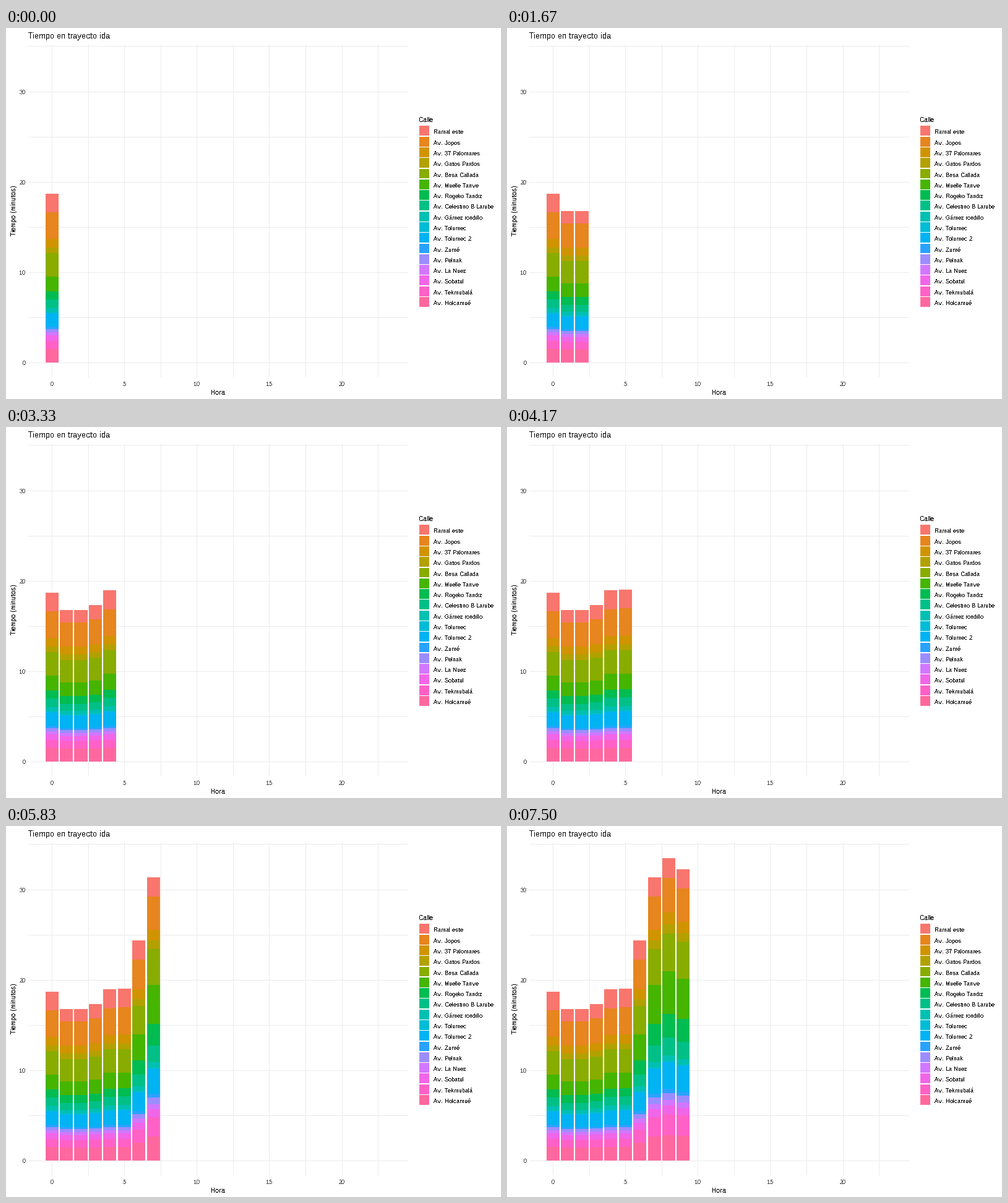
Write a matplotlib script that moves like this. It is 800 by 600 pixels and loops after 8000 ms.

```python
import math

import matplotlib.pyplot as plt
import numpy as np
from matplotlib.animation import FuncAnimation
from matplotlib.patches import Rectangle

W, H, DPI = 800, 600, 100
LOOP, INTERVAL = 8000, 40
STEP = 5000 / 6  # one more hour appears each step, in ms

plt.rcParams.update({
    "font.family": "Liberation Sans",
    "text.hinting": "native",
    "text.hinting_factor": 1,
    "text.antialiased": False,
})

# Minutes for the whole trip, by hour
TOTALS = [18.7, 16.78, 16.78, 17.33, 18.98, 19.05, 24.38, 31.36, 33.48, 32.25]

# Each street's weight in a light, a normal and a heavy hour
KEY_TOTALS = (16.8, 18.9, 32.4)
STREETS = [
    ("Ramal este", (20, 31, 31)),
    ("Av. Jopos", (39, 44, 55)),
    ("Av. 37 Palomares", (13, 14, 18)),
    ("Av. Gatos Pardos", (9, 9, 14)),
    ("Av. Brisa Callada", (36, 38, 60)),
    ("Av. Muelle Tarive", (22, 25, 66)),
    ("Av. Rogelio Tandiz", (12, 13, 37)),
    ("Av. Celestino B Larube", (11, 14, 28)),
    ("Av. Gámez rondillo", (6, 7, 9)),
    ("Av. Tolumec", (2, 2, 2)),
    ("Av. Tolumec 2", (20, 22, 42)),
    ("Av. Zumé", (3, 4, 6)),
    ("Av. Pelnak", (5, 5, 11)),
    ("Av. La Nuez", (5, 5, 9)),
    ("Av. Sobatul", (8, 9, 13)),
    ("Av. Tekmubalá", (12, 13, 33)),
    ("Av. Holcamué", (21, 22, 40)),
]

fig = plt.figure(figsize=(W / DPI, H / DPI), dpi=DPI, facecolor="white")
ax = fig.add_axes([0, 0, 1, 1])
ax.set_xlim(0, W)
ax.set_ylim(H, 0)
ax.axis("off")


def hue(i, chroma=100, light=65):
    """Evenly spaced hues in polar CIE-LUV, as sRGB."""
    angle = math.radians(15 + 360 * i / len(STREETS))
    u = chroma * math.cos(angle) / (13 * light) + 0.19784
    v = chroma * math.sin(angle) / (13 * light) + 0.46834
    y = ((light + 16) / 116) ** 3
    x = 9 * y * u / (4 * v)
    z = 3 * y / v - x / 3 - 5 * y
    linear = (3.240479 * x - 1.537150 * y - 0.498535 * z,
              -0.969256 * x + 1.875992 * y + 0.041556 * z,
              0.055648 * x - 0.204043 * y + 1.057311 * z)
    return [min(1, 1.055 * c ** (1 / 2.4) - 0.055) if c > 0.0031308
            else max(0, 12.92 * c) for c in linear]


COLORS = [hue(i) for i in range(len(STREETS))]


def box(x0, y0, x1, y1, color, z=1):
    return ax.add_patch(Rectangle((x0, y0), x1 - x0, y1 - y0, facecolor=color,
                                  linewidth=0, antialiased=False, zorder=z))


def label(x, y, text, px, color="black", ha="left", rotation=0):
    ax.text(x, y, text, fontsize=px * 72 / DPI, color=color, ha=ha,
            va="baseline", rotation=rotation, rotation_mode="anchor")


def tick_x(hour):
    return round(74 + 23.43 * hour)


def row(minutes):
    return int(541.5 - 14.615 * minutes)


def draw_grid():
    for k in range(10):
        x = tick_x(2.5 * k)
        box(x, 27, x + 1, 565, "#EBEBEB")
    for k in range(8):
        y = row(5 * k)
        box(36, y, 650, y + 1, "#EBEBEB")


def draw_axes():
    for hour in range(0, 21, 5):
        label(tick_x(hour), 579, str(hour), 9, "#4D4D4D", "center")
    for minutes in range(0, 31, 10):
        label(31.5, row(minutes) + 4, str(minutes), 9, "#4D4D4D", "right")
    label(36, 17, "Tiempo en trayecto ida", 13)
    label(343, 593, "Hora", 11, ha="center")
    label(16, 295, "Tiempo (minutos)", 11, ha="center", rotation=90)


def draw_legend():
    label(668, 152, "Calle", 11)
    for i, (name, _) in enumerate(STREETS):
        y = 158.43 + 17.28 * i
        box(668, round(y), 684, round(y + 15.9), COLORS[i])
        label(691, round(y) + 13, name, 9)


def draw_bar(hour, total):
    left = round(63.64 + 23.41 * hour)
    right = round(84.72 + 23.41 * hour)
    weights = np.array([np.interp(total, KEY_TOTALS, w) for _, w in STREETS])
    below = 1 - np.cumsum(weights) / weights.sum()
    edges = [row(total * share) for share in (1, *below)]
    return [box(left, y0, right, y1, color, 2)
            for y0, y1, color in zip(edges, edges[1:], COLORS)]


draw_grid()
draw_axes()
draw_legend()
bars = [draw_bar(hour, total) for hour, total in enumerate(TOTALS)]


def update(i):
    shown = int((i + 0.85) * INTERVAL / STEP) + 1
    for hour, parts in enumerate(bars):
        for part in parts:
            part.set_visible(hour < shown)
    return [part for parts in bars for part in parts]


anim = FuncAnimation(fig, update, frames=LOOP // INTERVAL, interval=INTERVAL,
                     repeat=True, repeat_delay=0)
plt.show()
```
